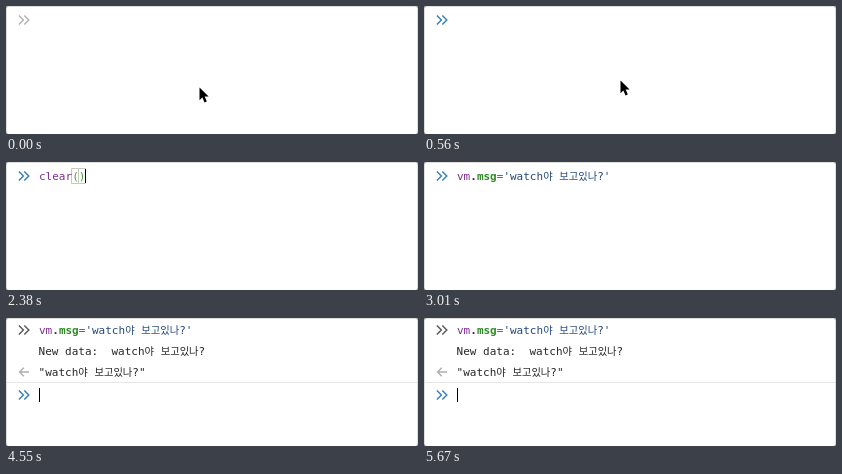
Write an HTML page that moves like this. It is 412 px wide and 128 px high and loops after 5880 ms.

```html
<!DOCTYPE html>
<html lang="ko">
<head>
<meta charset="utf-8">
<title>Console</title>
<style>
  html, body { margin: 0; width: 100%; height: 100%; overflow: hidden; background: #8c8c8c; }
  svg { display: block; width: 412px; height: 128px; }
  text { font: 11px "DejaVu Sans Mono", monospace; white-space: pre; fill: #262626; }
  .ko { font: 10.3px "Noto Sans CJK KR", "Noto Sans CJK", sans-serif; }
  .var { fill: #7b2d8e; }
  .prop { fill: #2f8a26; font-weight: bold; }
  .dot { fill: #333; font-weight: bold; }
  .op { fill: #555; }
  .str { fill: #24477f; }
  .match { fill: #4a9a3c; }
  .box { fill: none; stroke: #c6c9c0; }
  .icon { fill: none; stroke-width: 1.5; }
</style>
</head>
<body>
<svg viewBox="0 0 412 128">
  <defs>
    <path id="chevrons" class="icon" d="M12.9 -4.6 L17.4 0 L12.9 4.6 M18.3 -4.6 L22.8 0 L18.3 4.6"/>
    <g id="words">watch</g>
  </defs>
  <rect x=".5" y=".5" width="411" height="127" rx="2.5" fill="#fff" stroke="#dedede"/>
  <rect x="1" y="1" width="410" height="127" rx="2" fill="#fff"/>

  <g id="history">
    <use href="#chevrons" y="12" stroke="#5c5c5c"/>
    <text x="32.6" y="37">New data:  <tspan class="phrase"></tspan></text>
    <path class="icon" stroke="#b0b0b0" d="M23 54 H13.6 M17.8 49.8 L13.6 54 L17.8 58.2"/>
    <text x="32.6" y="58">"<tspan class="phrase"></tspan>"</text>
    <path d="M1 64.5 H411" stroke="#e6e6e6"/>
  </g>

  <use id="prompt" href="#chevrons"/>
  <g id="clear">
    <path class="box" d="M65.5 6.5 H72.5 V21.5 H65.5 Z M72.5 6.5 H79.5 V21.5 H72.5 Z"/>
    <text x="33" y="18"><tspan class="var">clear</tspan><tspan class="match">()</tspan></text>
  </g>
  <text id="assign" x="33"><tspan class="var">vm</tspan><tspan class="dot">.</tspan><tspan class="prop">msg</tspan><tspan class="op">=</tspan><tspan class="str">'<tspan class="phrase"></tspan>'</tspan></text>
  <rect id="caret" width="1" height="14" fill="#000"/>
  <path id="mouse" d="M.5 .5 V13.2 L3.4 10.5 L5.5 15.4 L7.8 14.4 L5.7 9.6 H9.6 Z"
        fill="#000" stroke="#fff" stroke-width=".8" paint-order="stroke"/>
</svg>
<script>
const LOOP = 5880;
const $ = id => document.getElementById(id);

// Each track: [start in ms, value], held until the next entry.
const tracks = {
  line: [[0, ''], [1190, 'clear'], [2450, 'assign'], [3570, 'done']],
  caret: [[0, 0], [70, 1], [420, 0], [910, 1], [1820, 0], [2380, 1], [3010, 0],
          [3500, 1], [4060, 0], [4550, 1], [5110, 0], [5670, 1]],
  focus: [[0, 0], [70, 1]],
  mouse: [[0, [193, 81]], [70, [200, 84]], [140, [205, 85]], [210, [199, 83]],
          [280, [193, 80]], [560, [196, 74]], [1190, null],
          [5110, [199, 66]], [5180, [199, 73]], [5250, [198, 84]],
          [5320, [196, 96]], [5390, [195, 105]], [5460, null]]
};
const caretX = { '': 33, clear: 79, assign: 186, done: 33 };

for (const el of document.querySelectorAll('.phrase'))
  el.innerHTML = 'watch<tspan class="ko">야</tspan> <tspan class="ko">보고있나</tspan>?';

function at(track, t) {
  let value;
  for (const [start, v] of track) if (start <= t) value = v;
  return value;
}

function show(id, on) {
  $(id).style.display = on ? '' : 'none';
}

function draw(t) {
  const line = at(tracks.line, t);
  const done = line === 'done';
  const pos = at(tracks.mouse, t);

  show('history', done);
  show('clear', line === 'clear');
  show('assign', done || line === 'assign');
  $('assign').setAttribute('y', done ? 16 : 18);

  $('prompt').setAttribute('y', done ? 77 : 14);
  $('prompt').setAttribute('stroke', at(tracks.focus, t) ? '#3b82b3' : '#b4b4b4');

  show('caret', at(tracks.caret, t));
  $('caret').setAttribute('x', caretX[line]);
  $('caret').setAttribute('y', done ? 70 : 7);

  show('mouse', pos);
  if (pos) $('mouse').setAttribute('transform', `translate(${pos})`);
}

const begin = performance.now();
function tick() {
  draw((performance.now() - begin) % LOOP);
  requestAnimationFrame(tick);
}
tick();
</script>
</body>
</html>
```
